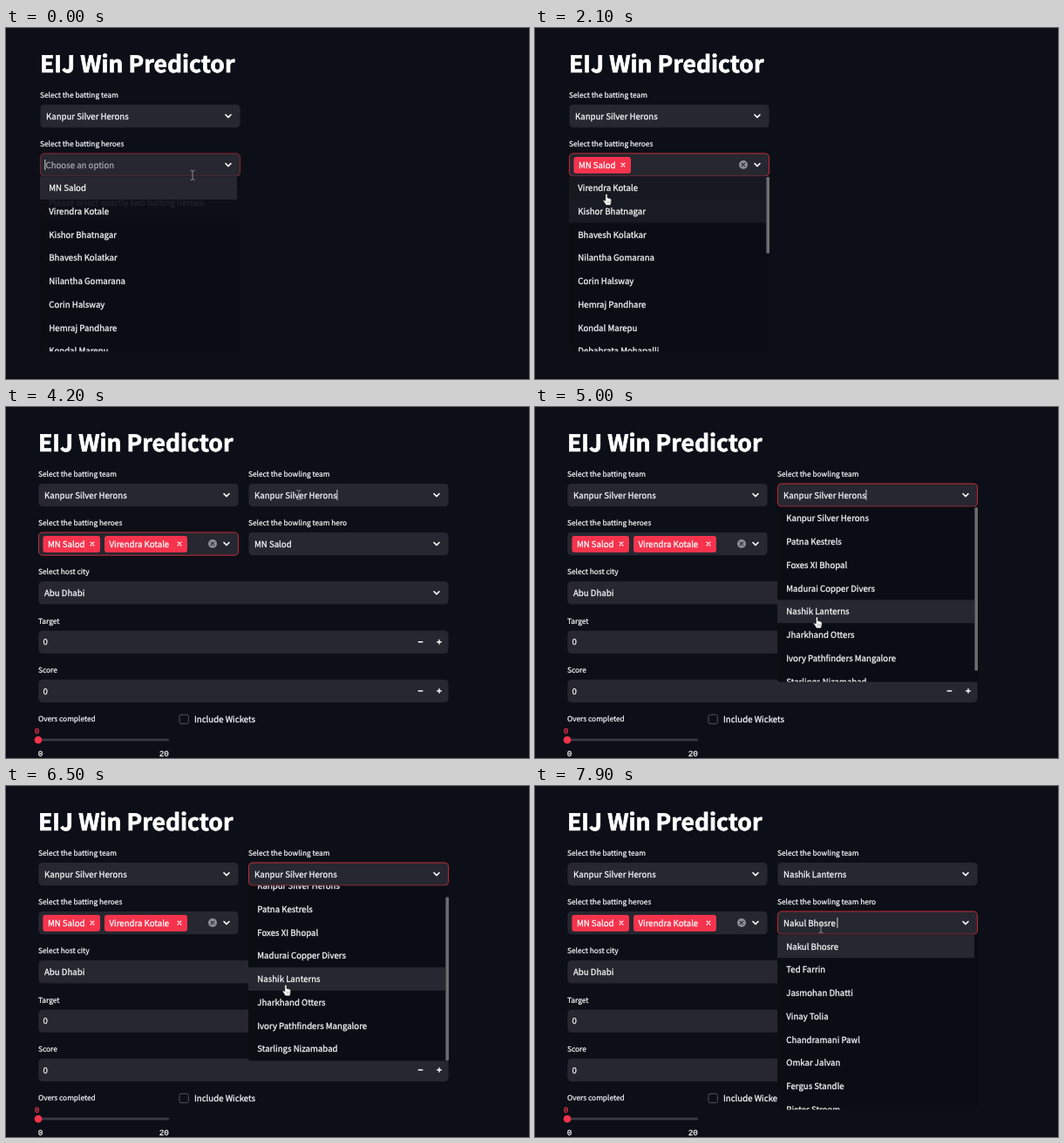
An HTML page that plays this animation: 600 by 403 pixels, repeating every 8000 ms.

```html
<!DOCTYPE html>
<html lang="en">
<head>
<meta charset="utf-8">
<title>Win Predictor</title>
<style>
html, body { margin: 0; width: 100%; height: 100%; overflow: hidden; background: #0c0f17; }
svg { display: block; text-rendering: geometricPrecision;
  font-family: "Noto Sans CJK JP", "Noto Sans CJK SC", "Noto Sans CJK KR", "Noto Sans CJK", "Noto Sans", sans-serif; }
text { white-space: pre; }
.mono { font-family: "Liberation Mono", "DejaVu Sans Mono", monospace; }
</style>
</head>
<body>
<svg id="stage" width="600" height="403" viewBox="0 0 600 403"></svg>
<script>
const LOOP = 8000, ROW = 26.75, MENU_H = 201;
const BG = '#0c0f17', MENU = '#0a0d14', FIELD = '#262730', RED = '#f6334c', INK = '#f8f9fa';
const BODY = 9.63, LABEL = 8.33;

const players = ['MN Salod', 'Virendra Kotale', 'Kishor Bhatnagar', 'Bhavesh Kolatkar', 'Nilantha Gomarana',
  'Corin Halsway', 'Hemraj Pandhare', 'Kondal Marepu', 'Debabrata Mohapalli', 'Anirban Lohia', 'Prakash Untwal'];
const teams = ['Kanpur Silver Herons', 'Patna Kestrels', 'Foxes XI Bhopal', 'Madurai Copper Divers',
  'Nashik Lanterns', 'Jharkhand Otters', 'Ivory Pathfinders Mangalore', 'Starlings Nizamabad'];
const rivals = ['Nakul Bhosre', 'Ted Farrin', 'Jasmohan Dhatti', 'Vinay Tolia', 'Chandramani Pawl',
  'Omkar Jalvan', 'Fergus Standle', 'Pieter Stroom'];

// pointer: time, x, y
const path = [[0, 214, 169], [100, 205, 172], [500, 100, 206], [700, 83, 202], [800, 82, 195.5], [1000, 82, 187],
  [1500, 82, 187], [1800, 82, 202], [2000, 82, 196], [2100, 82, 190.5], [2300, 82, 186], [2600, 82, 186],
  [2900, 90, 196], [3300, 94, 190], [4100, 336, 101], [4300, 336, 101], [4800, 325, 232], [5000, 323.5, 241],
  [5200, 323, 244], [5700, 322, 282], [6000, 322, 282], [6400, 321, 231], [6500, 321, 228], [6800, 321, 226],
  [7600, 328, 163], [8000, 328, 163]];
const scrollKeys = [[5900, 0], [6200, 13.2]];
// highlighted row: start time, row
const batHover = [[-300, 0], [450, 1], [850, 0], [1600, 1], [2010, 0]];
const teamHover = [[4000, 0], [4450, 1], [4550, 2], [4620, 3], [4720, 4], [5300, 5], [5500, 6], [6150, 5], [6250, 4]];
const heroHover = [[7000, 0]];

const clamp = v => Math.max(0, Math.min(1, v));
const ramp = (t, a, b) => clamp((t - a) / (b - a));

function track(keys, t) {
  let i = 0;
  while (i < keys.length - 2 && t >= keys[i + 1][0]) i++;
  const a = keys[i], b = keys[i + 1], p = ramp(t, a[0], b[0]), e = p * p * (3 - 2 * p);
  return a.slice(1).map((v, k) => v + (b[k + 1] - v) * e);
}

// y is the middle of the capitals; the thin outline thickens the strokes a little
const text = (x, y, s, size = BODY, fill = INK, extra = '') =>
  `<text x="${x}" y="${(y + size * 0.3665).toFixed(2)}" font-size="${size}" fill="${fill}" stroke="${fill}" stroke-width="${(size * 0.028).toFixed(2)}" ${extra}>${s}</text>`;
const rect = (x, y, w, h, fill, r = 0, extra = '') =>
  `<rect x="${x}" y="${y}" width="${w}" height="${h}" rx="${r}" fill="${fill}" ${extra}/>`;
const stroke = (d, color, w) =>
  `<path d="${d}" fill="none" stroke="${color}" stroke-width="${w}" stroke-linecap="round" stroke-linejoin="round"/>`;
const label = (x, y, s) => text(x, y, s, LABEL);
const caret = (x, y) => rect(x, y - 6, 0.9, 12, '#e8e8ea');
const chevron = (x, y) => stroke(`M${x - 3} ${y - 1.4}l3 3l3 -3`, INK, 1.5);

function field(x, y, w, focus = 0) {
  const edge = focus ? `stroke="#d92f3c" stroke-width=".9" stroke-opacity="${focus}"` : '';
  return rect(x + 0.4, y - 13, w - 0.8, 26.2, FIELD, 4.5, edge);
}
const select = (x, y, w, s, focus) =>
  field(x, y, w, focus) + text(x + 7, y, s) + chevron(x + w - 14, y);
const number = (y) => field(37, y, 471) + text(42.5, y, '0') +
  stroke(`M473.2 ${y}h4.6M494.7 ${y}h4.6M497 ${y - 2.3}v4.6`, INK, 1.4);

function tag(x, w, s) {
  const cx = x + w - 9;
  return rect(x, 147.9, w, 19, RED, 3) + text(x + 5.5, 157, s, BODY, '#fff') +
    stroke(`M${cx - 1.9} 155.2l3.8 3.8m0 -3.8l-3.8 3.8`, '#fff', 1.2);
}

function heroes(x, picked, focus, showCaret) {
  let s = field(x, 157, 230, focus);
  if (!picked) {
    s += text(x + 6.5, 157, 'Choose an option', BODY, '#a3a5ac');
    if (showCaret) s += caret(x + 5.4, 157);
  } else {
    const cx = x + 200;
    s += tag(x + 5.4, 65.6, players[0]);
    if (picked > 1) s += tag(x + 76, 95, players[1]);
    s += `<circle cx="${cx}" cy="157" r="5" fill="#8b8d95"/>` +
      stroke(`M${cx - 1.7} 155.3l3.4 3.4m0 -3.4l-3.4 3.4`, FIELD, 1.2);
  }
  return s + chevron(x + 216, 157);
}

function menu(x, y, names, total, hover, t, opts = {}) {
  const { scroll = 0, alpha = 1, bar = true } = opts;
  let s = rect(x, y, 230, MENU_H, MENU, 2, `fill-opacity="${alpha}"`);
  let rows = '';
  hover.forEach(([start, row], i) => {
    const next = hover[i + 1];
    const o = ramp(t, start, start + 200) * (next ? 1 - ramp(t, next[0], next[0] + 200) : 1);
    if (o > 0) rows += rect(x, y + row * ROW - scroll, 226, ROW, FIELD, 0, `fill-opacity="${o.toFixed(2)}"`);
  });
  names.slice(0, 9).forEach((n, i) => { rows += text(x + 10.3, y + 13.4 + i * ROW - scroll, n); });
  s += `<clipPath id="list"><rect x="${x}" y="${y}" width="230" height="${MENU_H}"/></clipPath><g clip-path="url(#list)">${rows}</g>`;
  if (bar) {
    const k = MENU_H / (total * ROW);
    s += rect(x + 226.4, y + 0.8 + scroll * k, 3.6, MENU_H * k - 1.2, '#6b6c70', 1.2);
  }
  return s;
}

function lowerFields(t, team, hero, focus, blink) {
  let s = label(278, 76.5, 'Select the bowling team') + select(278, 101, 230, team, focus.team);
  if (t >= 4200 && t < 6000 && blink) s += caret(379.5, 101);
  s += label(278, 133, 'Select the bowling team hero') + select(278, 157, 230, hero, focus.hero);
  if (t >= 7800) s += caret(346.5, 157);
  s += label(37, 189, 'Select host city') + select(37, 213.3, 471, 'Abu Dhabi');
  s += label(37, 245.5, 'Target') + number(269.8);
  s += label(37, 301.8, 'Score') + number(326);
  s += label(37, 358, 'Overs completed');
  s += text(32.8, 371.5, '0', 9.3, RED, 'class="mono"');
  s += rect(37, 380.8, 150, 2.8, '#3a3b44', 1.4) + `<circle cx="37" cy="382.3" r="4.3" fill="${RED}"/>`;
  s += text(36.7, 397.8, '0', 9.3, INK, 'class="mono"') + text(175.7, 397.8, '20', 9.3, INK, 'class="mono"');
  s += rect(199, 353.3, 10.4, 10.4, BG, 2, 'stroke="#50525b" stroke-width="1"');
  return s + text(216, 358.5, 'Include Wickets');
}

function pointer(t) {
  const [x, y] = track(path, t);
  let s;
  if (t < 200 || (t >= 3900 && t < 4400) || t >= 7400) {
    s = stroke('M-2.1 -5.5Q0 -5.5 0 -4.3Q0 -5.5 2.1 -5.5M0 -4.5V4.5M-2.1 5.5Q0 5.5 0 4.3Q0 5.5 2.1 5.5', '#a2a4a9', 0.8);
  } else if (t >= 3100 && t < 3900) {
    s = '<path d="M0 0V11L2.6 8.6L4.3 12.4L6 11.6L4.3 8H7.8Z" fill="#fff" stroke="#111" stroke-width=".7"/>';
  } else {
    s = '<path d="M-1.2 .8Q0 -.8 1.1 .8V4.6Q2 4 2.7 5Q3.8 4.5 4.3 5.5Q5.6 5.2 5.7 6.6V9.2Q5.5 11 4.6 13H-.6Q-1.8 10.6 -4 7.8Q-3.4 6 -1.2 7.8Z" fill="#fff" stroke="#111" stroke-width=".7" stroke-linejoin="round"/>' +
      stroke('M1.1 8.2v2.6M2.8 8.2v2.6M4.4 8.2v2.6', '#777', 0.5);
  }
  return `<g transform="translate(${x.toFixed(2)} ${y.toFixed(2)})">${s}</g>`;
}

function scene(t) {
  const picked = t < 1200 ? 0 : t < 2400 ? 1 : 2;
  const wide = t >= 2600, x = wide ? 37 : 39;
  const team = t < 6700 ? teams[0] : teams[4];
  const hero = t < 7000 ? players[0] : rivals[0];
  const blink = Math.floor(t / 500) % 2 === 0;
  const focus = {
    bat: t < 4300 ? 0.65 + 0.35 * ramp(t, 0, 200) : 0,
    team: t >= 4300 && t < 7200 ? 1 : 0,
    hero: t >= 7800 ? 1 : 0
  };

  let s = rect(0, 0, 600, 403, BG);
  s += text(x, 41, 'EIJ', 26.5, '#fff', 'font-weight="700"');
  s += text(x + 223.5, 41, 'Win Predictor', 26.5, '#fff', 'font-weight="700" text-anchor="end"');
  s += label(x, 76.5, 'Select the batting team') + select(x, 101, 230, teams[0]);
  s += label(x, 133, 'Select the batting heroes') + heroes(x, picked, focus.bat, blink);

  if (wide) {
    s += `<g opacity="${0.5 + 0.5 * ramp(t, 2600, 2700)}">${lowerFields(t, team, hero, focus, blink)}</g>`;
  } else {
    s += rect(39, 182, 230, 36, '#2a1a22', 4) +
      text(49, 200.5, 'Please select exactly two batting heroes.', BODY, '#b5a9ac');
  }

  if (t < 3000) {
    s += menu(x, 170.2, players.slice(picked), 18 - picked, batHover, t,
      { alpha: 0.86 + 0.14 * ramp(t, 0, 200), bar: t >= 200 });
  } else if (t >= 4300 && t < 6700) {
    s += menu(278, 114.4, teams, 8, teamHover, t, { scroll: track(scrollKeys, t)[0], bar: t >= 4500 });
  } else if (t >= 7800) {
    s += menu(278, 170.6, rivals, 18, heroHover, t, { alpha: t < 7900 ? 0.8 : 1, bar: false });
  }
  return s + pointer(t);
}

const stage = document.getElementById('stage');
let shown = -1;
function tick() {
  const t = Math.floor((performance.now() % LOOP) / 100) * 100;
  if (t !== shown) {
    shown = t;
    stage.innerHTML = scene(t);
  }
  requestAnimationFrame(tick);
}
tick();
</script>
</body>
</html>
```
